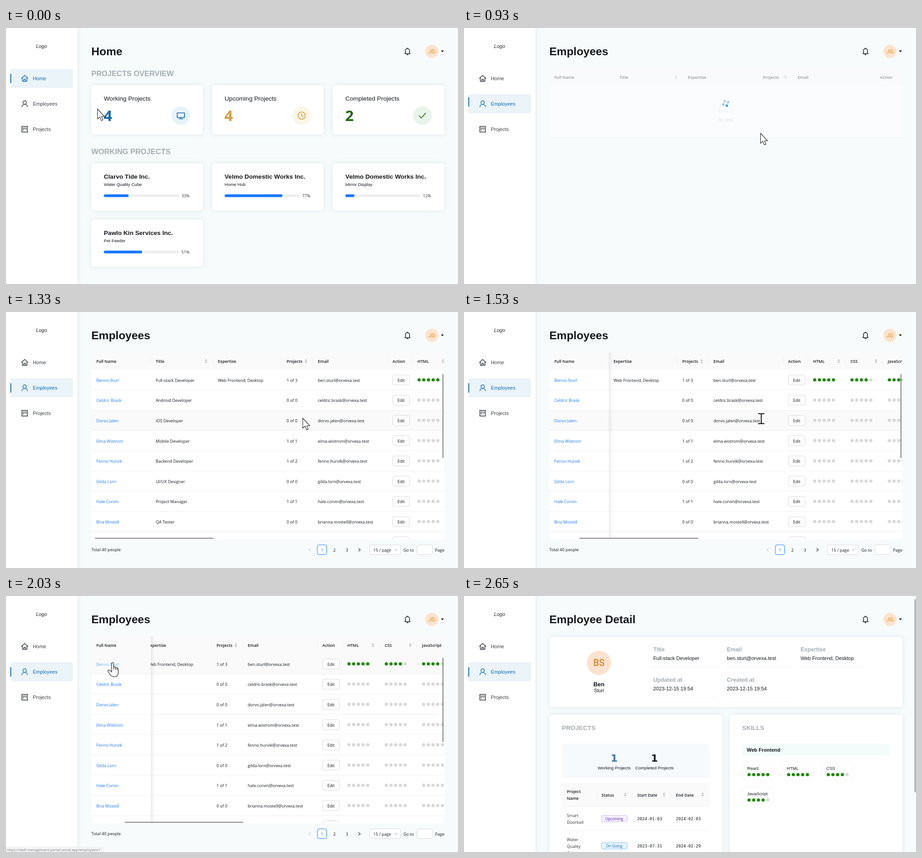
An HTML page that plays this animation: 993x564 px, repeating every 2.76 s.

```html
<!DOCTYPE html>
<html lang="en">
<head>
<meta charset="utf-8">
<title>Staff portal</title>
<style>
  html, body { margin: 0; width: 100%; height: 100%; overflow: hidden; background: #f7fbfc; }
  svg { display: block; width: 993px; height: 564px; font-family: "Liberation Sans", Arial, sans-serif; }
  text { white-space: pre; }
  .ui { font-family: "Open Sans", "Noto Sans", sans-serif; }
  .num { font-family: "Noto Sans", sans-serif; }
  .initials { font-family: Roboto, sans-serif; }
  .one { font-family: "DejaVu Sans", sans-serif; }
  .mono { font-family: "DejaVu Sans Mono", monospace; }
  .bold { font-weight: 700; }
  .semi { font-weight: 600; }
  .italic { font-style: italic; }
  .mid { text-anchor: middle; }
  .card { fill: #fff; filter: drop-shadow(0 0 6px rgba(20, 60, 80, .1)); }
  .line { fill: none; stroke-linejoin: round; stroke-linecap: round; }
</style>
</head>
<body>
<svg id="stage" viewBox="0 0 993 564"></svg>
<script>
const LOOP = 2760;
const STEPS = [0, 110, 210, 310, 410, 510, 600, 710, 810, 930, 1030, 1130, 1230, 1330, 1430, 1530,
  1630, 1730, 1830, 1930, 2030, 2130, 2230, 2330, 2430, 2550, 2650];
const OPEN_LIST = 600, LIST_LOADED = 1130, OPEN_DETAIL = 2230, DETAIL_LOADED = 2550;

const CURSOR = [[0, 201, 178.5], [110, 195, 178], [410, 89, 167.5], [600, 89, 167.5], [710, 140, 171], [810, 346, 185],
  [930, 651.5, 232], [1330, 652, 234], [1530, 653, 235], [1730, 653, 235], [1830, 560, 215], [1930, 330, 165],
  [2030, 234, 148], [2130, 234, 148], [2230, 229, 147]];
const SCROLL = [[1330, 0], [1430, 60], [1530, 137], [1630, 151], [1730, 154]];
const MARKER = [[600, 101], [710, 112], [810, 142], [930, 152.5], [1030, 157]];
const FADE = [[2130, 0], [2330, 1]];

const BLUE = '#1677ff', INK = '#14181d', MUTED = '#a3adb3', RULE = '#f0f0f0', GREEN = '#1f8a0a';

const PEOPLE = [
  ['Benno Sturl', 'Full-stack Developer', '1 of 3', 'ben.sturl'],
  ['Celdric Brask', 'Android Developer', '0 of 0', 'celdric.brask'],
  ['Dorvo Jalen', 'iOS Developer', '0 of 0', 'dorvo.jalen'],
  ['Elma Wistrom', 'Mobile Developer', '1 of 1', 'elma.wistrom'],
  ['Fenno Hurvik', 'Backend Developer', '1 of 2', 'fenno.hurvik'],
  ['Gilda Lorn', 'UI/UX Designer', '0 of 0', 'gilda.lorn'],
  ['Hale Corvin', 'Project Manager', '1 of 1', 'hale.corvin'],
  ['Bria Mostell', 'QA Tester', '0 of 0', 'brianna.mostell'],
  ['', '', '', '']
];
const MAIL = '@orvexa.test';

// Piecewise linear value at time t from [time, ...values] keys.
function tween(keys, t) {
  const i = keys.findIndex(k => k[0] > t);
  if (i < 0) return keys.at(-1).slice(1);
  if (i === 0) return keys[0].slice(1);
  const a = keys[i - 1], b = keys[i], p = (t - a[0]) / (b[0] - a[0]);
  return a.slice(1).map((v, n) => v + (b[n + 1] - v) * p);
}

const each = (list, fn) => list.map(fn).join('');
const text = (x, y, size, str, cls = '', fill = INK) =>
  `<text x="${x}" y="${y}" font-size="${size}" class="${cls}" fill="${fill}">${str}</text>`;
const rect = (x, y, w, h, fill, r = 0, extra = '') =>
  `<rect x="${x}" y="${y}" width="${w}" height="${h}" rx="${r}" fill="${fill}" ${extra}/>`;
const card = (x, y, w, h) => `<rect class="card" x="${x}" y="${y}" width="${w}" height="${h}" rx="6"/>`;
const box = (x, y, w, h, stroke, fill = '#fff') => rect(x, y, w, h, fill, 4, `stroke="${stroke}"`);
const circle = (x, y, r, fill, extra = '') => `<circle cx="${x}" cy="${y}" r="${r}" fill="${fill}" ${extra}/>`;
const path = (x, y, d, stroke, width = 1.4) =>
  `<path class="line" transform="translate(${x} ${y})" d="${d}" stroke="${stroke}" stroke-width="${width}"/>`;
const group = (attrs, body) => `<g ${attrs}>${body}</g>`;
const cell = (x, y, str, fill = INK) => text(x, y, 9.1, str, 'ui', fill);
const head = (x, y, str) => text(x, y, 9, str, 'ui semi');
const sorter = (x, y) =>
  `<path transform="translate(${x} ${y})" d="M-3-1 0-4.5 3-1ZM-3 1 0 4.5 3 1Z" fill="#bbb"/>`;
const dots = (x, y, on) => each([0, 1, 2, 3, 4], i => circle(x + i * 10.3, y, 3.6, i < on ? GREEN : '#d9d9d9'));

const ICON = {
  home: 'M-7 0 0-6.5 7 0M-5-1.5V6.5H5V-1.5M-1.8 6.5V2H1.8V6.5',
  user: 'M-3.8-2.7A3.8 3.8 0 1 1 3.8-2.7A3.8 3.8 0 1 1-3.8-2.7M-6 6.7C-5.5-.5 5.5-.5 6 6.7',
  board: 'M-6.3-6.3H6.3V6.3H-6.3ZM-3.3-3.5V2.5M0-3.5V-.5M3.3-3.5V1',
  bell: 'M-6 5H6M-4.5 5V-1.5C-4.5-7.5 4.5-7.5 4.5-1.5V5M0-6V-7.5M-1.5 7.3H1.5',
  screen: 'M-8-6H8V4H-8ZM0 4V7M-4.5 7H4.5',
  clock: 'M-8 0A8 8 0 1 1 8 0A8 8 0 1 1-8 0M0-4.5V.5L3.2 2.5',
  check: 'M-7 .5-2.5 5.5 7-5.5'
};

function sidebar(t, hovered) {
  const active = t < OPEN_LIST ? 0 : 1;
  const items = [['Home', 'home'], ['Employees', 'user'], ['Projects', 'board']];
  return card(-10, -10, 167, 584) + text(66, 44, 10.9, 'Logo', 'italic', '#222') +
    each(items, ([label, icon], i) => {
      const y = 111 + i * 56, on = i === active, color = on ? '#0f6ab4' : '#3c4148';
      const fill = on ? '#ebf4f8' : i === 1 && hovered ? '#f0f4f7' : '#fff';
      return rect(10, y - 21, 137, 42, fill, 4) + path(41, y, ICON[icon], on ? color : '#30363d') +
        text(59, y + 4, 10.9, label, '', color);
    }) + rect(9.5, tween(MARKER, t)[0], 2, 20.5, '#0f6ab4');
}

function topBar(title) {
  return text(187.5, 60, 24.5, title, 'bold') + path(882, 51.5, ICON.bell, INK, 1.5) +
    circle(935.5, 51.5, 14.5, '#fde3cf') + text(935.5, 56, 12.2, 'JG', 'initials mid', '#dc9427') +
    '<path d="M955.5 49.5H962L958.7 53.3Z" fill="#111"/>';
}

function homePage() {
  const column = i => 187.5 + i * 265.3;
  const totals = [
    ['Working Projects', 4, '#0f6ab4', '#e8f3f9', 'screen'],
    ['Upcoming Projects', 4, '#d99a3c', '#fbf7e7', 'clock'],
    ['Completed Projects', 2, '#23690f', '#e9f4ea', 'check']
  ];
  const projects = [
    ['Clarvo Tide Inc.', 'Water Quality Cube', 33],
    ['Velmo Domestic Works Inc.', 'Home Hub', 77],
    ['Velmo Domestic Works Inc.', 'Mirror Display', 12],
    ['Pawlo Kin Services Inc.', 'Pet Feeder', 51]
  ];
  return topBar('Home') +
    text(187.5, 105.8, 16.4, 'PROJECTS OVERVIEW', 'bold', MUTED) +
    text(187.5, 277.8, 16.4, 'WORKING PROJECTS', 'bold', MUTED) +
    each(totals, ([label, count, color, tint, icon], i) => {
      const x = column(i);
      return card(x, 126, 245, 108.5) + text(x + 27.5, 160, 13.6, label) +
        text(x + 27, 205, 33, count, 'num bold', color) +
        circle(x + 196.7, 193, 20.5, tint) + path(x + 196.7, 193, ICON[icon], color, 1.7);
    }) +
    each(projects, ([company, name, percent], i) => {
      const x = column(i % 3), y = i < 3 ? 298 : 422;
      return card(x, y, 245, 103.5) + text(x + 27.5, y + 34, 13.6, company, 'bold') +
        text(x + 27.5, y + 50, 9.6, name) + rect(x + 27.5, y + 68.4, 165, 6, '#efefef', 3) +
        rect(x + 27.5, y + 68.4, 1.65 * percent, 6, BLUE, 3) + cell(x + 198, y + 75, percent + '%', '#333');
    });
}

function spinner(x, y, t) {
  const turn = 20 + (t - 930) * .3;
  return group(`transform="translate(${x} ${y}) rotate(${turn})"`,
    each([[4, -4], [4, 4], [-4, 4], [-4, -4]], ([dx, dy], i) =>
      circle(dx, dy, 2.7, '#4096e0', `opacity="${[.5, .95, .5, .4][i]}"`)));
}

function loadingTable(t) {
  const heads = [[198.5, 'Full Name'], [342, 'Title'], [492, 'Expertise'], [657, 'Projects'], [733, 'Email'], [913.5, 'Action']];
  const empty = rect(187.5, 89, 776, 38.7, '#fafafa') + rect(187.5, 127.7, 776, 113, '#fff') +
    rect(187.5, 240.5, 776, 1, RULE) + each(heads, ([x, label]) => head(x, 112, label)) +
    sorter(466, 108.5) + sorter(706.5, 108.5) +
    group('opacity=".6"', path(575, 178, 'M-15-2-10-10H10L15-2V7H-15ZM-15-2H-6C-6 3 6 3 6-2H15', '#d0d0d0', 1)) +
    text(575, 204.5, 9.1, 'No data', 'ui mid', '#c4c4c4');
  return group('opacity=".42"', empty) + spinner(575, 166, t);
}

function employeeTable(t, x, y, kind) {
  const scroll = tween(SCROLL, t)[0];
  const top = i => 127.7 + i * 44.6;
  const hover = Math.floor((y - 127.7) / 44.6);
  const fill = i => i === hover ? '#fafafa' : '#fff';
  const heads = [[329, 'Title'], [465.5, 'Expertise'], [616.5, 'Projects'], [685, 'Email'], [849, 'Action'],
    [904, 'HTML'], [986, 'CSS'], [1068, 'JavaScript']];
  const rows = each(PEOPLE, ([, title, projects, mail], i) => {
    const mid = top(i) + 22, base = mid + 4;
    return cell(329, base, title) + (i ? '' : cell(465.5, base, 'Web Frontend, Desktop')) +
      cell(616.5, base, projects) + cell(685, base, mail && mail + MAIL) +
      box(849.5, mid - 11, 37, 22, '#d9d9d9') + text(868, base, 9.1, 'Edit', 'ui mid') +
      each([5, 4, 4], (level, n) => dots(907.5 + n * 82, mid - .2, i ? 0 : level));
  });
  const moving = rows + each(heads, ([hx, label]) => head(hx, 112, label)) +
    each([439.5, 659, 960, 1042, 1124], sx => sorter(sx, 108.5)) +
    each([454, 604.5, 673, 838, 892, 974, 1056], sx => rect(sx, 101, 1, 15, RULE));
  const rules = (rx, w) => each(PEOPLE, (_, i) => rect(rx, top(i + 1) - 1, w, 1, RULE));
  const fixed = rect(187, 89, 131, 38.7, '#fafafa') + head(198.5, 112, 'Full Name') +
    each(PEOPLE, ([name], i) => rect(187, top(i), 131, 44.6, fill(i)) +
      cell(198.5, top(i) + 26, name, i === hover && kind === 'hand' ? '#69b1ff' : BLUE)) + rules(187, 131);
  return '<clipPath id="view"><rect x="188" y="89" width="775" height="412"/></clipPath>' +
    '<linearGradient id="edge"><stop stop-opacity=".07"/><stop offset="1" stop-opacity="0"/></linearGradient>' +
    group('clip-path="url(#view)"',
      rect(187, 89, 776, 38.7, '#fafafa') + each(PEOPLE, (_, i) => rect(187, top(i), 776, 44.6, fill(i))) +
      rules(187, 776) + group(`transform="translate(${-scroll} 0)"`, moving) + fixed +
      (scroll ? rect(318, 89, 9, 412, 'url(#edge)') : rect(317, 101, 1, 15, RULE)) +
      rect(195.5 + scroll * .423, 497.5, 261, 2, '#808080', 1) + rect(959, 136, 2, 186, '#808080', 1)) +
    pager();
}

function pager() {
  const mid = (x, str, color) => text(x, 527.5, 9.1, str, 'ui mid', color);
  return cell(187.5, 527.3, 'Total 40 people') + path(667, 524, 'M2-3-2 0 2 3', '#bbb', 1) +
    box(684, 513, 20.5, 21.5, BLUE) + mid(694.3, '1', BLUE) + mid(721.5, '2') + mid(749, '3') +
    path(776.5, 524, 'M-2-3 2 0-2 3', '#333', 1.1) +
    box(799, 513, 68, 21.5, '#d9d9d9') + cell(807, 527.5, '15 / page') + path(856, 524, 'M-3-2 0 2 3-2', '#aaa', 1) +
    cell(873, 527.5, 'Go to') + box(903, 513, 34, 21.5, '#d9d9d9') + cell(942.5, 527.5, 'Page');
}

function projectTable(t) {
  const loaded = t >= DETAIL_LOADED;
  const heads = rect(215, 411, 325, 52, '#fafafa') + head(226, 434, 'Project') + head(226, 449, 'Name') +
    head(302, 441.5, 'Status') + head(380.5, 441.5, 'Start Date') + head(465.5, 441.5, 'End Date') +
    each([354.5, 439.5, 524.5], x => sorter(x, 437.5)) + each([291, 369, 454], x => rect(x, 430, 1, 15, RULE)) +
    rect(215, 463, 325, 1, RULE);
  if (!loaded) return group('opacity=".5"', heads) + spinner(377, 505, t);
  const row = (words, y, base, tag, [tint, edge, color], start, end) =>
    each(words, (word, i) => cell(226, base + i * 15, word, '#333')) +
    rect(302, y - 7, 56.5, 14, tint, 3, `stroke="${edge}"`) + text(330, y + 3.3, 8.2, tag, 'ui mid', color) +
    text(380.5, y + 3.2, 9.1, start, 'mono') + text(465.5, y + 3.2, 9.1, end, 'mono');
  return heads + rect(215, 516.5, 325, 1, RULE) +
    row(['Smart', 'Doorbell'], 490.5, 486.5, 'Upcoming', ['#f6f0ff', '#cdb5f5', '#531dab'], '2024-01-03', '2024-02-03') +
    row(['Water', 'Quality', 'Cube'], 550.5, 539.5, 'On Going', ['#e6f4ff', '#84c5f5', '#1268b8'], '2023-07-31', '2024-02-29');
}

function detailPage(t) {
  const fields = [[0, 0, 'Title', 'Full-stack Developer'], [1, 0, 'Email', 'ben.sturl' + MAIL],
    [2, 0, 'Expertise', 'Web Frontend, Desktop'], [0, 1, 'Updated at', '2023-12-15 19:54'], [1, 1, 'Created at', '2023-12-15 19:54']];
  const skills = [['React', 5], ['HTML', 5], ['CSS', 4], ['JavaScript', 4]];
  const total = (x, color, label) =>
    text(x, 365, 22, '1', 'one bold mid', color) + text(x, 382, 9.65, label, 'mid');
  return topBar('Employee Detail') + group(`opacity="${tween(FADE, t)[0]}"`,
    card(187.5, 90, 775.5, 154.5) + card(187.5, 262, 379.5, 320) + card(584, 262, 379, 320) +
    circle(296.5, 147.3, 26.7, '#fde3cf') + text(296.5, 153.5, 20, 'BS', 'initials mid', '#d46b08') +
    text(296.5, 199, 13, 'Ben', 'bold mid') + text(296.5, 211.5, 10.7, 'Sturl', 'mid') +
    each(fields, ([col, line, label, value]) => {
      const x = 415.8 + col * 161.8, y = line * 67;
      return text(x, y + 122, 12.3, label, 'bold', MUTED) + text(x, y + 140.6, 11.1, value) +
        rect(x, y + 156, 141, 1, RULE);
    }) +
    text(215, 295, 13.7, 'PROJECTS', 'bold', MUTED) + rect(215, 325.5, 325, 75.5, '#f6fafd', 6) +
    total(330, '#3a76ae', 'Working Projects') + total(418.5, INK, 'Completed Projects') + projectTable(t) +
    text(611, 295, 13.7, 'SKILLS', 'bold', MUTED) + rect(611, 325, 325, 27, '#f4fbfb', 6) +
    text(621.3, 342.7, 11, 'Web Frontend', 'bold') +
    each(skills, ([name, level], i) => {
      const x = 611.5 + i % 3 * 87, y = i < 3 ? 365.5 : 421.5;
      return box(x, y, 69, 38.5, '#f5f5f5') + text(x + 10.5, y + 17, 9.65, name) + dots(x + 14.7, y + 28, level);
    })) + rect(990, 7, 2, 425.5, '#8a8a8a', 1);
}

function pointer(x, y, kind) {
  const shapes = {
    arrow: '<path d="M0 0V22L5 17.5 8.5 25.5 12 24 8.7 16.5H15.5Z" fill="#fff" stroke="#222" stroke-width="1.1"/>',
    hand: '<path d="M-2 1C-2-2 2.5-2 2.5 1V9C3.5 7 6.5 8 6.5 10 8 8 10 9 10 11 11.5 10 12.5 11 12.5 13V21C12.5 26 10 30 4 30' +
      'C-2 30-4 27-6 24L-10 18C-11 16-8 14-6 16L-2 19ZM2.5 9V14M6.5 10V14.5M10 11V15" fill="#fff" stroke="#222" stroke-width="1.2"/>',
    beam: each([['#fff', 4], ['#111', 2]], ([color, width]) =>
      path(0, 0, 'M-6-11H-2Q0-11 0-9Q0-11 2-11H6M0-9V9M-6 11H-2Q0 11 0 9Q0 11 2 11H6', color, width))
  };
  return group(`transform="translate(${x} ${y})"`, shapes[kind]);
}

function statusBar(route) {
  const width = route === 'employees' ? 207 : 214;
  return rect(0, 552, width, 12, '#f3f4f5', 2) +
    text(2, 561.7, 7.75, 'https://staff-management-portal.vercel.app/' + route, 'ui', '#777');
}

function scene(t) {
  const [x, y] = tween(CURSOR, t), scroll = tween(SCROLL, t)[0];
  const home = t < OPEN_LIST, detail = t >= OPEN_DETAIL;
  const onNav = x < 147 && y < 188;
  const onName = t >= 2030 && !detail;
  const onMail = scroll > 33 && scroll < 142;
  const kind = onNav || onName ? 'hand' : onMail ? 'beam' : 'arrow';
  const page = home ? homePage()
    : detail ? detailPage(t)
    : topBar('Employees') + (t < LIST_LOADED ? loadingTable(t) : employeeTable(t, x, y, kind));
  const link = home && onNav ? 'employees' : onName ? 'employees/1' : '';
  return rect(0, 0, 993, 564, '#f7fbfc') + sidebar(t, onNav) + page +
    (link && statusBar(link)) + (t < 2650 ? pointer(x, y, kind) : '');
}

const stage = document.getElementById('stage');
let shown = -1;
function play(now) {
  const t = STEPS.findLast(step => step <= now % LOOP);
  if (t !== shown) stage.innerHTML = scene(shown = t);
  requestAnimationFrame(play);
}
play(0);
</script>
</body>
</html>
```
